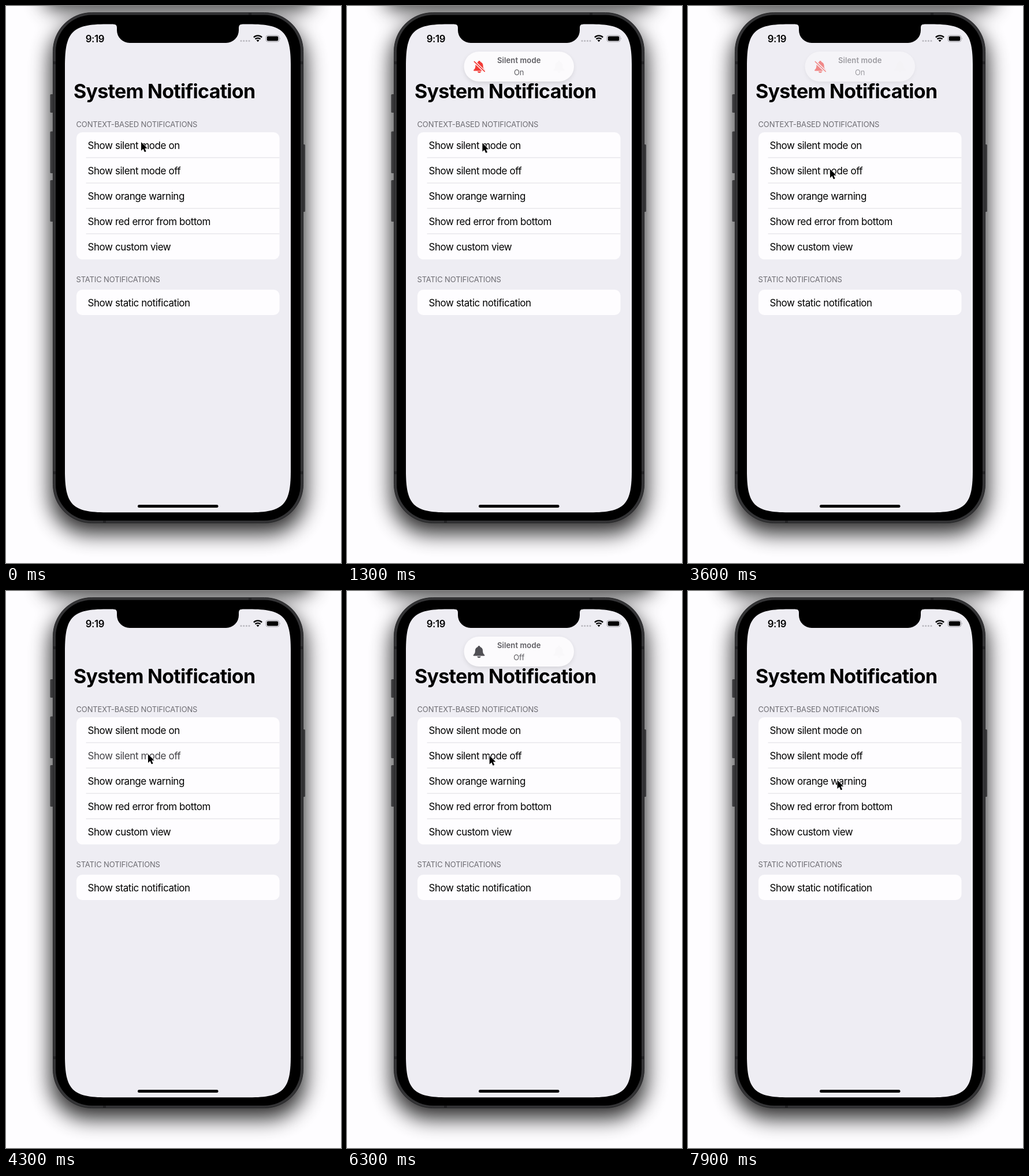
Write an HTML page that moves like this. It is 580x966 px and loops after 8000 ms.

```html
<!DOCTYPE html>
<html lang="en">
<head>
<meta charset="utf-8">
<title>System Notification</title>
<style>
  html, body { margin: 0; width: 100%; height: 100%; overflow: hidden; background: #fefdff; }
  svg { display: block; width: 580px; height: 966px; }
  text { font-family: Inter, "Liberation Sans", sans-serif; white-space: pre; }
  .title { font-size: 34px; font-weight: 700; letter-spacing: -.74px; }
  .row { font-size: 17px; letter-spacing: -.43px; }
  .head { font-size: 13px; letter-spacing: -.13px; fill: #6d6c72; }
  .time { font-size: 16.8px; font-weight: 600; letter-spacing: -.4px; }
  .toast { font-size: 13px; fill: #5c5b60; text-anchor: middle; }
  .bold { font-weight: 600; letter-spacing: .12px; }
</style>
</head>
<body>
<svg viewBox="0 0 580 966">
  <defs>
    <filter id="far" x="-30%" y="-20%" width="160%" height="140%"><feGaussianBlur stdDeviation="18"/></filter>
    <filter id="near" x="-20%" y="-60%" width="140%" height="220%"><feGaussianBlur stdDeviation="5"/></filter>
    <g id="bell">
      <path d="M0-10c-1.2 0-2 .9-2 2-3 .9-4.6 3.4-4.6 6.5 0 4.5-1.6 6-3 7.3-.6.6-.4 1.7.6 1.7h18c1 0 1.2-1.1.6-1.7-1.4-1.3-3-2.8-3-7.3 0-3.1-1.6-5.6-4.6-6.5 0-1.1-.8-2-2-2z"/>
      <path d="M-3 8.6h6a3 2.4 0 0 1-6 0z"/>
    </g>
  </defs>

  <!-- shadows -->
  <g filter="url(#far)" opacity=".83">
    <rect x="66" y="-882" width="463" height="887" rx="18"/>
    <rect x="77.500" y="29" width="441" height="886" rx="66"/>
  </g>

  <!-- phone body -->
  <g fill="#3b3b3d">
    <rect x="76.5" y="153" width="8" height="32" rx="1.5"/>
    <rect x="76.5" y="217.500" width="8" height="72.500" rx="1.5"/>
    <rect x="76.5" y="302" width="8" height="72" rx="1.5"/>
    <rect x="510" y="240" width="8" height="117" rx="1.5"/>
  </g>
  <rect x="81.5" y="11.5" width="433" height="885" rx="67" fill="#343436" stroke="#242426"/>
  <g fill="#242426">
    <rect x="82" y="96" width="5" height="5"/><rect x="509" y="96" width="5" height="5"/>
    <rect x="82" y="807" width="5" height="5"/><rect x="509" y="807" width="5" height="5"/>
    <rect x="420" y="12" width="5" height="4"/><rect x="168" y="892" width="5" height="4"/>
  </g>
  <rect x="86" y="15.500" width="424" height="877" rx="63"/>
  <!-- screen with continuous corners -->
  <path d="M174 31.500H421c59 0 72 13 72 72V806.300c0 59-13 72-72 72H174c-59 0-72-13-72-72V103.500c0-59 13-72 72-72z" fill="#eeedf3"/>

  <!-- page -->
  <text class="title" x="117" y="159.500">System Notification</text>
  <text class="head" x="121.500" y="209.700">CONTEXT-BASED NOTIFICATIONS</text>
  <text class="head" x="121.500" y="479.200">STATIC NOTIFICATIONS</text>
  <rect x="122" y="219" width="351.500" height="220.500" rx="10" fill="#fefdff"/>
  <rect x="122" y="492" width="351.500" height="44" rx="10" fill="#fefdff"/>
  <path d="M138.500 263H473.500M138.500 307H473.500M138.500 351H473.500M138.500 395H473.500" stroke="#dddce1"/>
  <g id="rows"></g>
  <rect x="228" y="865" width="139.500" height="5" rx="2.500"/>

  <!-- toast, rest position -->
  <g id="toast">
    <rect x="204" y="83" width="187" height="50" rx="25" opacity=".13" filter="url(#near)"/>
    <rect x="202.500" y="79" width="190.500" height="52" rx="26" fill="#fcfbfd"/>
    <use href="#bell" x="367" y="104.500" opacity=".009"/>
    <g id="on">
      <use href="#bell" transform="translate(229 105)" fill="#f23a35"/>
      <path d="M219.500 95.700L239 114.300" stroke="#fcfbfd" stroke-width="4.400"/>
      <path d="M220.300 96.500L238.200 113.500" stroke="#f23a35" stroke-width="1.700" stroke-linecap="round"/>
    </g>
    <use id="off" href="#bell" x="228.500" y="105" fill="#504f54"/>
    <text class="toast bold" x="297.700" y="99.300">Silent mode</text>
    <text class="toast" id="state" x="297.700" y="120"></text>
  </g>

  <!-- notch and status bar -->
  <path d="M186 30v1.500q6 0 6 6v4.500a22 22 0 0 0 22 22h167a22 22 0 0 0 22-22v-4.500q0-6 6-6v-1.500z"/>
  <text class="time" x="137.700" y="62.500">9:19</text>
  <g fill="#b9b8be">
    <circle cx="407" cy="60.500" r="1.500"/><circle cx="411.700" cy="60.500" r="1.500"/>
    <circle cx="416.400" cy="60.500" r="1.500"/><circle cx="421" cy="60.500" r="1.500"/>
  </g>
  <g fill="none" stroke="#000" stroke-width="2.300">
    <path d="M428.900 54.400a10 10 0 0 1 14.200 0M431.500 57.400a6.400 6.400 0 0 1 9 0"/>
  </g>
  <path d="M436 62.200l-2.500-2.600a3.600 3.600 0 0 1 5 0z"/>
  <rect x="450" y="51" width="23" height="11" rx="3.500" fill="none" stroke="#a3a2a8"/>
  <rect x="451.700" y="52.600" width="19.600" height="7.800" rx="2"/>
  <path d="M474.300 54.800q1.600 1.700 0 3.500z" fill="#a3a2a8"/>

  <path id="cursor" d="M0 0V15L3.500 11.800 6 17.300 8.600 16.200 6.200 10.800H10.700Z" stroke="#fff" stroke-width="1.200" paint-order="stroke" stroke-linejoin="round"/>
</svg>
<script>
const $ = id => document.getElementById(id);
const LOOP = 8000, STEP = 100;

const labels = ["Show silent mode on", "Show silent mode off", "Show orange warning",
  "Show red error from bottom", "Show custom view", "Show static notification"];
const rows = labels.map((label, i) => {
  const row = document.createElementNS("http://www.w3.org/2000/svg", "text");
  row.setAttribute("class", "row");
  row.setAttribute("x", 141.5);
  row.setAttribute("y", i < 5 ? 247.5 + 44.1 * i : 520.8);
  row.textContent = label;
  return $("rows").appendChild(row);
});

const clamp = v => Math.min(1, Math.max(0, v));
const smooth = v => v * v * (3 - 2 * v);
const progress = (t, from, to) => clamp((t - from) / (to - from));

// Spring with response 0.55 s and damping 0.825
function spring(s) {
  if (s <= 0) return 0;
  const zeta = .825, omega = 2 * Math.PI / .55, root = Math.sqrt(1 - zeta * zeta);
  const a = omega * root * s;
  return 1 - Math.exp(-zeta * omega * s) * (Math.cos(a) + zeta / root * Math.sin(a));
}

function draw(t) {
  const first = t < 4000;
  const pressed = t >= 100 && t < 400 ? 0 : t >= 4300 && t < 4500 ? 1 : -1;
  rows.forEach((row, i) => row.setAttribute("fill", i === pressed ? "#434246" : "#000"));

  const enter = first ? 270 : 4410, leave = first ? 3530 : 7730;
  const drop = 140 * (spring((t - enter) / 1000) - 1);
  $("toast").setAttribute("transform", `translate(0 ${drop})`);
  $("toast").setAttribute("opacity", t < enter ? 0 : 1 - progress(t, leave, leave + 160));
  $("on").setAttribute("visibility", first ? "inherit" : "hidden");
  $("off").setAttribute("visibility", first ? "hidden" : "inherit");
  $("state").textContent = first ? "On" : "Off";

  const a = smooth(progress(t, 1200, 2100)), b = smooth(progress(t, 6200, 6900));
  $("cursor").setAttribute("transform", `translate(${234 + 12 * a + 12.5 * b} ${236 + 47 * a + 45 * b})`);
}

const start = performance.now();
function tick() {
  const t = (performance.now() - start) % LOOP;
  draw(Math.floor(t / STEP) * STEP);
  requestAnimationFrame(tick);
}
tick();
</script>
</body>
</html>
```
